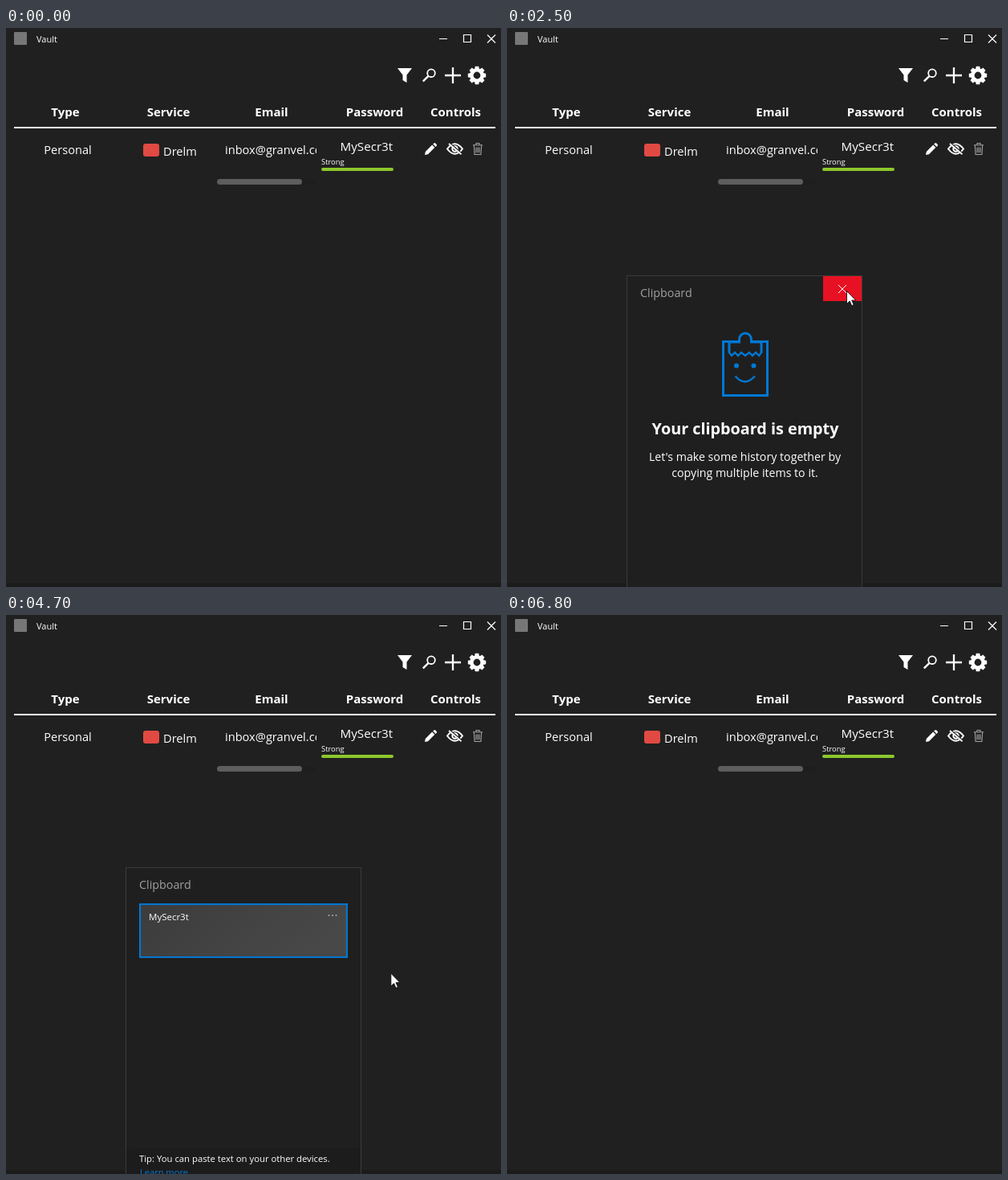
Recreate the animation shown at these times as an HTML page. Size 617x696 px, loop 7100 ms.

```html
<!DOCTYPE html>
<html lang="en">
<head>
<meta charset="utf-8">
<title>Vault</title>
<style>
  html, body { margin: 0; width: 100%; height: 100%; overflow: hidden; background: #202020; }
  svg { display: block; width: 100vw; height: 100vh; }
  text { font-family: "Open Sans", "Noto Sans", sans-serif; fill: #fff; }
  .mid { text-anchor: middle; }
  .head { font-size: 15px; font-weight: 700; }
  .cell { font-size: 14.6px; }
  .line { fill: none; stroke: #fff; }
  .blue { fill: none; stroke: #0078d4; stroke-width: 3; }
</style>
</head>
<body>
<svg viewBox="0 0 617 696">
  <defs>
    <clipPath id="emailClip"><rect x="263" y="130" width="124" height="50"/></clipPath>
    <linearGradient id="cardFill" x1="0" y1="0" x2="1" y2="0.3">
      <stop offset="0" stop-color="#3c3c3c"/><stop offset="1" stop-color="#484848"/>
    </linearGradient>
  </defs>
  <rect width="617" height="696" fill="#202020"/>
  <rect y="691" width="617" height="5" fill="#1b1b1b"/>

  <!-- title bar -->
  <rect x="10" y="5" width="16" height="16" rx="1" fill="#777"/>
  <text x="38" y="18" font-size="11">Vault</text>
  <path class="line" stroke-width="1.2" d="M540 13.5h10M570.5 8.5h9v9h-9zM600 8.5l10 10m0-10l-10 10"/>

  <!-- toolbar -->
  <path fill="#fff" d="M488 50h18l-6.5 8.5v9.5l-5-3v-6.5z"/>
  <circle class="line" cx="530" cy="56.2" r="4.8" stroke-width="1.8"/>
  <path class="line" stroke-width="2.4" d="M526.4 59.8L519.8 66.4"/>
  <path class="line" stroke-width="2.3" d="M547 59h20M557 49v20"/>
  <g id="gear" transform="translate(587 59)">
    <circle class="line" r="6.6" stroke-width="4.4"/>
  </g>

  <!-- table -->
  <g id="heads"></g>
  <path id="row" fill="#282828" d="M10 125h600v71q0 4-4 4H14q-4 0-4-4z"/>
  <path class="line" stroke-width="2" d="M10 124H610"/>
  <rect x="263" y="188" width="124" height="7" rx="3.5" fill="#1e1e1e"/>
  <rect x="263" y="188" width="106" height="7" rx="3.5" fill="#5d5d5d"/>
  <text class="cell mid" x="77" y="157">Personal</text>
  <rect x="171" y="144" width="20" height="16" rx="3" fill="#e04a43"/>
  <text class="cell" x="196" y="159">Drelm</text>
  <g clip-path="url(#emailClip)"><text class="cell" x="273" y="157">inbox@granvel.com</text></g>
  <rect id="hover" x="387" y="130" width="124" height="65" rx="5" fill="#333"/>
  <text class="mid" x="449.3" y="153" font-size="15.2">MySecr3t</text>
  <text x="393" y="170" font-size="9.4">Strong</text>
  <rect x="393" y="174" width="90" height="4" rx="2" fill="#8cc82d"/>
  <text id="copied" class="mid" x="449" y="193" font-size="11.7" style="fill:#8d8d8d">Copied to clipboard!</text>

  <!-- row controls -->
  <path fill="#fff" d="M522 158l.8-4 8.4-8.4 3.2 3.2-8.4 8.4zM532.2 144.6l1.2-1.2q.9-.7 1.8 0l1.5 1.5q.7.9 0 1.8l-1.2 1.2z"/>
  <path class="line" stroke-width="2" d="M550 150.5q9.5-12.5 19 0q-9.5 12.5-19 0z"/>
  <circle class="line" cx="559.5" cy="150.5" r="3.2" stroke-width="2"/>
  <path stroke="#202020" stroke-width="1.6" d="M553.5 143.5l15 13"/>
  <path class="line" stroke-width="1.8" d="M552 144l15.5 13.2"/>
  <path fill="none" stroke="#a2a2a2" stroke-width="1.1" d="M582 145.8h12M586 145.5v-2h4v2M583.3 146l.8 11.5h7.8l.8-11.5M586 148.5v6.8M588 148.5v6.8M590 148.5v6.8"/>

  <!-- clipboard panel -->
  <g id="panel">
    <rect x="149.5" y="308.5" width="293" height="400" fill="#1f1f1f" stroke="#3b3b3b"/>
    <text x="166" y="335" font-size="14.3" style="fill:#a0a0a0">Clipboard</text>
    <g id="empty">
      <rect id="red" x="394" y="309" width="48" height="31" fill="#e81123"/>
      <path class="line" d="M413 320l10 10m0-10l-10 10"/>
      <path class="blue" d="M269.5 390.5h55v67h-55z"/>
      <path class="blue" fill="none" style="fill:#1f1f1f" stroke-width="2.6" d="M277 403v-12h12.5v-3.500a7.500 7.500 0 0 1 15 0v3.500h12.500v12"/>
      <path class="blue" style="stroke-width:2.4" d="M276 402.500l4 5.500 4-4 4 4 4-4 5 4 5-4 4 4 4-4 4 4 4-5.500"/>
      <g fill="#0078d4"><circle cx="286" cy="420.500" r="3"/><circle cx="307.500" cy="420.500" r="3"/></g>
      <path class="blue" style="stroke-width:2.4" d="M284.500 433.500q12 13.500 24.500 0"/>
      <text class="mid" x="297" y="506" font-size="19.8" font-weight="700">Your clipboard is empty</text>
      <g class="mid" font-size="14.2">
        <text x="296.500" y="539">Let's make some history together by</text>
        <text x="296.500" y="559">copying multiple items to it.</text>
      </g>
    </g>
    <g id="filled">
      <rect x="167" y="354" width="258" height="66" fill="url(#cardFill)" stroke="#0078d4" stroke-width="2"/>
      <text x="178" y="374" font-size="11.5">MySecr3t</text>
      <g fill="#aaa"><circle cx="402.500" cy="368" r="1"/><circle cx="407" cy="368" r="1"/><circle cx="411.500" cy="368" r="1"/></g>
      <rect x="150" y="658" width="292" height="50" fill="#1c1c1c"/>
      <text x="166" y="675" font-size="11.3">Tip: You can paste text on your other devices.</text>
      <text x="167" y="692" font-size="11.1" text-decoration="underline" style="fill:#0078d4">Learn more</text>
    </g>
  </g>

  <path id="cursor" fill="#fff" stroke="#111" stroke-width=".9" d="M.5.5v16l3.700-3.500 2.500 5.700 2.500-1.100-2.500-5.600h5z"/>
</svg>
<script>
const LOOP = 7100, STEP = 100;
const $ = id => document.getElementById(id);
const NS = "http://www.w3.org/2000/svg";
const clamp = v => Math.min(1, Math.max(0, v));
const ramp = (t, a, b) => clamp((t - a) / (b - a));
const show = (id, on) => { $(id).style.opacity = Number(on); };

function add(parent, tag, attrs, text = "") {
  const el = document.createElementNS(NS, tag);
  for (const k in attrs) el.setAttribute(k, attrs[k]);
  el.textContent = text;
  parent.append(el);
}

[["Type", 74], ["Service", 202.5], ["Email", 331], ["Password", 459.5], ["Controls", 560.5]]
  .forEach(([label, x]) => add($("heads"), "text", { class: "head mid", x, y: 110 }, label));
for (let a = 0; a < 360; a += 45)
  add($("gear"), "path", { d: "M-3-7.500L-2.200-11.200H2.200L3-7.500z", fill: "#fff", transform: `rotate(${a})` });

// pointer path: time, x, y
const path = [
  [600, 640, 240], [700, 605, 259], [800, 500, 295], [1000, 342, 356], [1100, 310, 378],
  [1300, 183, 500], [1700, 400, 549], [1900, 420, 377], [2000, 416, 360], [2100, 425, 340],
  [2300, 425, 340], [2500, 423, 327], [2700, 424, 327], [2900, 543, 235], [3100, 452, 169],
  [3300, 447, 167], [4000, 447, 167], [4300, 489, 266], [4500, 518, 315], [4800, 460, 511],
  [5200, 225, 395], [5300, 185, 382], [5400, 198, 368], [5600, 190, 372], [5700, 167, 382],
  [5900, 313, 388], [6100, 313, 388], [6300, 570, 203], [6400, 640, 190]
];

function pointer(t) {
  const i = path.findIndex(p => p[0] > t);
  if (i < 1) return [640, 240];
  const [t0, x0, y0] = path[i - 1], [t1, x1, y1] = path[i];
  const k = (t - t0) / (t1 - t0);
  return [x0 + (x1 - x0) * k, y0 + (y1 - y0) * k];
}

function draw(t) {
  const first = t >= 400 && t < 2700;
  const second = t >= 4500 && t < 6800;
  const rise = ramp(t, first ? 300 : 4400, first ? 700 : 4800);
  show("panel", first || second);
  show("empty", first);
  show("filled", second);
  $("panel").setAttribute("transform", `translate(0 ${388 * (1 - rise) ** 3})`);
  show("red", t >= 2400 && t < 2700);

  const hover = ramp(t, 2800, 3100) * (1 - ramp(t, 4300, 4600));
  show("row", hover);
  show("hover", hover);
  show("copied", ramp(t, 3400, 3700) * (1 - ramp(t, 4300, 4600)));

  $("cursor").setAttribute("transform", `translate(${pointer(t)})`);
}

const start = performance.now();
function tick() {
  const t = (performance.now() - start) % LOOP;
  draw(Math.floor(t / STEP) * STEP);
  requestAnimationFrame(tick);
}
tick();
</script>
</body>
</html>
```
